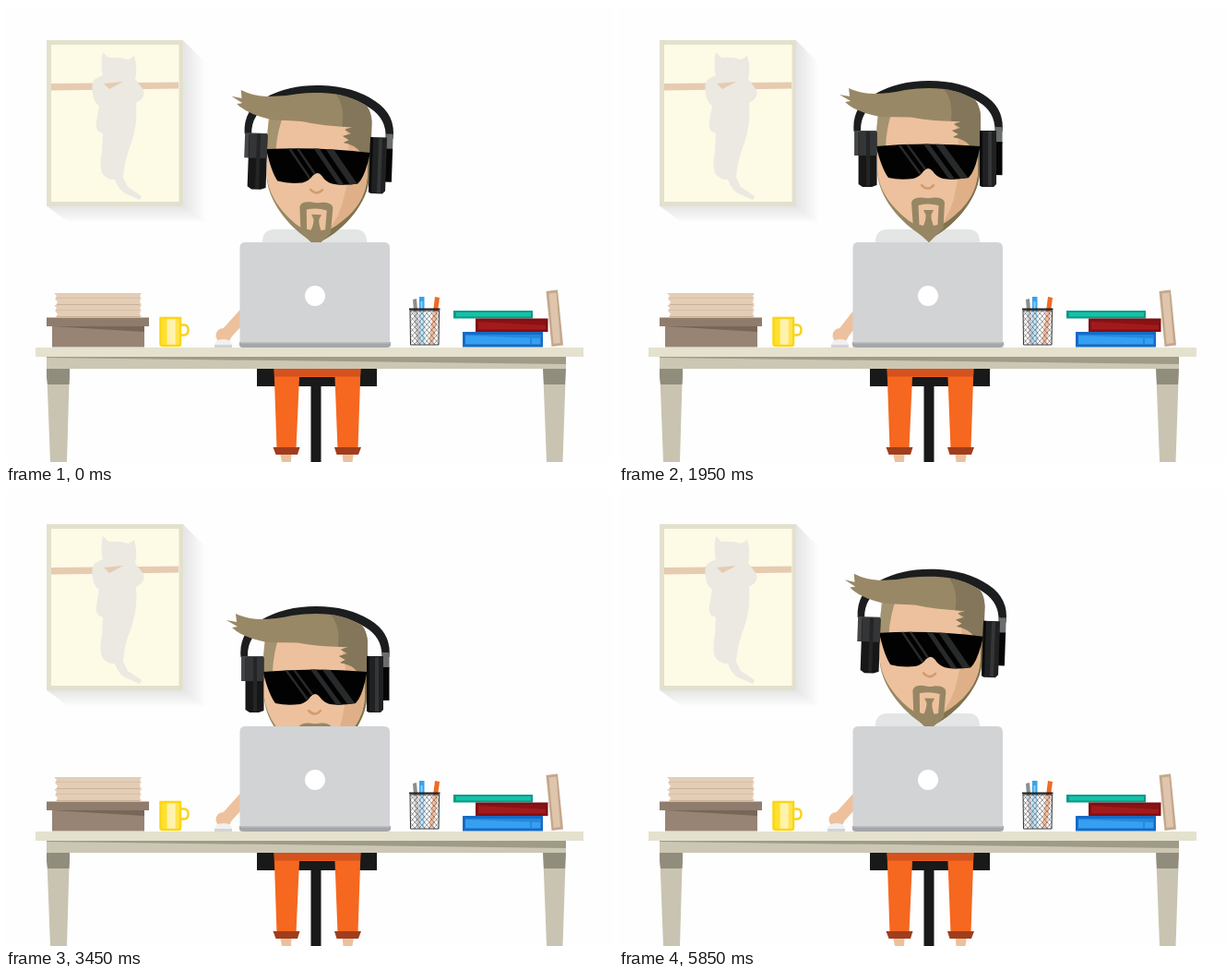
Write an HTML page that moves like this. It is 658x494 px and loops after 5.88 s.

```html
<!DOCTYPE html>
<html lang="en">
<head>
<meta charset="utf-8">
<title>Desk music</title>
<style>
html, body { margin: 0; width: 100%; height: 100%; overflow: hidden; background: #fefefe; }
svg { display: block; width: 658px; height: 494px; }
</style>
</head>
<body>
<svg viewBox="0 0 658 494" xmlns="http://www.w3.org/2000/svg">
  <defs>
    <linearGradient id="mug">
      <stop offset=".3" stop-color="#ffe02e"/><stop offset=".36" stop-color="#fff1a6"/>
      <stop offset=".72" stop-color="#fff3b4"/><stop offset=".78" stop-color="#ffe44c"/>
    </linearGradient>
    <pattern id="mesh" width="5.200" height="6" patternUnits="userSpaceOnUse" x="438" y="330">
      <path d="M0 0L5.200 6M5.200 0L0 6" stroke="#555" stroke-width=".6"/>
    </pattern>
    <clipPath id="lens"><use href="#lensShape"/></clipPath>
    <clipPath id="face"><use href="#faceShape"/></clipPath>
    <clipPath id="hairClip"><use href="#hairShape"/></clipPath>
  </defs>

  <!-- poster -->
  <g id="shadow"></g>
  <path d="M44 37H192V217H44Z" fill="#e3e1cd"/>
  <path d="M49 42H187.500V212H49Z" fill="#fdfae6"/>
  <path d="M49 84L187 82.500V89.500L49 91.500Z" fill="#e6cbb1"/>
  <path d="M105 50L111 56Q122 55 133 58L139 54Q143 68 140 79L149 91Q151 99 144 103L141 105Q143 128 136 148Q128 168 127 186L132 196L147 206L145 210L129 203Q122 199 118 188Q110 189 104 181Q101 171 104 158L105 138Q96 136 98 125L101 108Q95 104 94 95Q92 82 97 79L105 75Q102 62 105 50Z" fill="#ebe9e1"/>
  <path d="M106 84L127 82L112 90Z" fill="#e6cbb1"/>

  <!-- chair and legs -->
  <path d="M272 391H402V412H341.500V494H330.500V412H272Z" fill="#191919"/>
  <path d="M297 484H309.500L309 494H299ZM364.500 484H377L375.500 494H365.500Z" fill="#edc09c"/>
  <path d="M290.500 391H384.500L381.500 480H359.500L356.500 402H318L314.500 480H293.500Z" fill="#f6671f"/>
  <path d="M290.500 391H384.500L384 401.500H291Z" fill="#d5521f"/>
  <path d="M289.500 478H318.500L316 486H292.500ZM356 478H385L382 486H358.500Z" fill="#a03d1c"/>

  <!-- desk -->
  <path d="M44 390H69L66 494H48ZM582 390H607L603.500 494H586Z" fill="#c9c4b1"/>
  <path d="M44 392H69V402L68.500 410H45L44 402ZM582 392H607L606 410H583Z" fill="#918d7c"/>
  <path d="M44 379H607V393H44Z" fill="#cbc7b3"/>
  <path d="M44 379H607V388L44 381Z" fill="#a09b87"/>
  <path d="M32 370H626V380H32Z" fill="#e4e1cf"/>

  <!-- papers and box -->
  <g id="papers"></g>
  <path d="M50 346H150V369.500H50Z" fill="#988474"/>
  <path d="M50 346H150V353L50 347Z" fill="#786658"/>
  <path d="M44 337.500H155V347H44Z" fill="#8f7c6c"/>

  <!-- mug -->
  <path d="M190 345.500H193Q197.500 345.500 197.500 351Q197.500 356.500 193 356.500H190" fill="none" stroke="#fad21c" stroke-width="2.500"/>
  <path d="M167.500 338H189V366Q189 368 187 368H170Q167.500 368 167.500 366Z" fill="url(#mug)" stroke="#fcd515" stroke-width="2.500"/>

  <!-- pen pot -->
  <path d="M441 318L445 317L449 366H445Z" fill="#8b8d8e"/>
  <path d="M448 315H453.500V366H448Z" fill="#35a3ec"/>
  <path d="M449.500 320H451.500V366H449.500Z" fill="#8dd0f8"/>
  <path d="M465 315L470 316L463.500 366H458.500Z" fill="#f06a24"/>
  <path d="M438 330H469.500L469 367H438.500Z" fill="#fff" fill-opacity=".55"/>
  <path d="M438 330H469.500L469 367H438.500Z" fill="url(#mesh)" stroke="#333"/>
  <path d="M437 328.500H470.500" stroke="#222" stroke-width="2.200"/>

  <!-- books -->
  <path d="M485 330H571V338.500H485Z" fill="#0b9a85"/><path d="M488 332H569V336.500H488Z" fill="#13c2aa"/>
  <path d="M509 338.500H587.500V353H509Z" fill="#7f1013"/><path d="M512 341H585V350.500H512Z" fill="#a31a1d"/>
  <path d="M512 341H585V346L512 342Z" fill="#8a1215"/>
  <path d="M495 353H582V369.500H495Z" fill="#176ac4"/><path d="M498 356H579.500V366.500H498Z" fill="#35a0f2"/>
  <path d="M498 356H579.500V360L498 357ZM568 356H570V366.500H568Z" fill="#2388de"/>
  <path d="M585.500 309L598 307.500L604 367.500L591.500 369Z" fill="#c4a78c"/>
  <path d="M588.500 311.500L596.500 310.500L601 365L593.500 366Z" fill="#dfc5ac"/>

  <path id="hood" d="M278 262V254Q279 242 291 242H379Q390 242 391 254V262Z" fill="#e4e5e5"/>

  <g id="head">
    <path d="M254.500 137Q252 110 276 97Q302 82 336 82Q371 82 395 97Q418 111 415.500 137H407.500Q408 116 390 105Q368 91 336 91Q304 91 281 104Q261 115 262 137Z" fill="#1c1d1e"/>
    <path d="M280 120L391 118V180C391 206 367 237 341 251L336 257L331 251C305 237 280 206 280 180Z" fill="#978663"/>
    <path d="M391 118V180C391 206 367 237 341 251L352 236L385 186Z" fill="#80734f"/>
    <path id="faceShape" d="M280 106H389V180Q388 203 371 221Q357 235 345 240H326Q313 235 300 221Q282 202 280 180Z" fill="#edc19d"/>
    <path d="M361 112Q374 160 365 200Q361 224 347 241H395V112Z" fill="#dfb088" clip-path="url(#face)"/>
    <path d="M282 116L296 115Q290 132 289 153H279Q278 130 282 116Z" fill="#a49370"/>
    <path id="hairShape" d="M239 97L250 99L249 90Q262 96 276 96Q293 96 310 92Q323 90 336 90Q366 90 386 103Q391 109 392 120V153H381Q375 145 362 143L368 140L361 136L370 133L363 129L371 126Q340 126 316 121.500Q299 121 283 121Q256 116 245 105L251 104Z" fill="#998866"/>
    <path d="M347 86Q363 99 360 124L362 143L382 158H396V86Z" fill="#83765a" clip-path="url(#hairClip)"/>

    <path d="M317 214Q318 208 329 208.500Q335 210 341 208.500Q352 208 353 214L351.500 242L336 257L319 242Z" fill="#978663"/>
    <path d="M324.500 217Q335 214 346.500 217L345.500 238L341 239Q338 232 338.500 227L341 222H330L332.500 227Q333 232 330 239L325.500 238Z" fill="#edc19d"/>
    <path d="M328 195Q335 202 341 195" fill="none" stroke="#d29b6f" stroke-width="2.500" stroke-linecap="round"/>

    <path id="lensShape" d="M278.500 153Q335 148 391.500 153L389 164Q385 181 379 187Q362 190 351 188Q344 186 340 180Q335 174 330 180Q326 186 319 188Q304 190 292 187Q285 178 278.500 153Z" fill="#020202"/>
    <g clip-path="url(#lens)" stroke="#28292a">
      <path d="M299 145L335 194M308 145L344 194" stroke-width="2.500"/>
      <path d="M329 145L365 194" stroke-width="5"/><path d="M343 145L379 194" stroke-width="7"/>
    </g>

    <path d="M255 136H279V163H255Z" fill="#454647"/>
    <path d="M259.500 138H279.500V195L274 197H264L259.500 194Z" fill="#171717"/>
    <path d="M260 137H279.500V163H260Z" fill="#343536"/>
    <path d="M268 137H272V196H268Z" fill="#242526"/>
    <path d="M408 132H415.500V150H408Z" fill="#6b6c6d"/>
    <path d="M405 148H415.500V184H405Z" fill="#060606"/>
    <path d="M391 136H409V194L406 197H393L391 195Z" fill="#202122"/>
    <path d="M400 137H404V196H400Z" fill="#353637"/>
    <path d="M391 136H394V196H391Z" fill="#0c0c0c"/>
  </g>

  <path id="arm" fill="none" stroke="#edc19d" stroke-width="13" stroke-linecap="round"/>
  <g id="hand">
    <ellipse cx="236" cy="357" rx="8.500" ry="8" fill="#edc19d"/>
    <path d="M226 368Q226 361 236 361Q245 361 245 368Z" fill="#f0f0f0"/>
    <path d="M226 367H245V370H226Z" fill="#d3d4d4"/>
  </g>

  <!-- laptop -->
  <path d="M253.500 367V262Q253.500 256 259.500 256H410Q416 256 416 262V367Z" fill="#d1d3d5"/>
  <path d="M253 364H417V367Q417 370 413 370H257Q253 370 253 367Z" fill="#a4a6a9"/>
  <path d="M254 364H416V365.500H254Z" fill="#bcbec0"/>
  <circle cx="335" cy="314" r="11" fill="#fff"/>
</svg>
<script>
const LOOP = 5880, BEAT = 588, STEP = 30;
const $ = id => document.getElementById(id);

// stacked faint copies fade the shadow away from the frame
$("shadow").innerHTML = Array.from({ length: 8 }, (_, i) => {
  const d = 2.9 * (i + 1), e = 0.74 * d;
  return `<path d="M192 37L${192 + d} ${37 + d}V${217 + e}H${44 + d}L44 217Z" fill="#000" fill-opacity=".011"/>`;
}).join("");

$("papers").innerHTML = [311, 317.5, 324, 330.5].map((y, i) => {
  const x = 52 + i % 2;
  return `<path d="M${x} ${y}H${147 - i % 2}L145 ${y + 3}L147 ${y + 6.2}H${x + 1}L${x + 3} ${y + 3}Z" fill="#e4cdb6"/>` +
    `<path d="M${x + 2} ${y + 6}H145" stroke="#cbb199" stroke-width="1"/>`;
}).join("");

// rows of [time, value], eased between neighbours
const TILT = [[0, 2], [376, -2], [588, -2], [964, 2], [1764, 2], [2140, -2],
  [2940, -2], [3400, 0], [4770, 0], [5210, 5.5], [5370, 5.3], [5760, 2], [LOOP, 2]];
const DROP = [[2940, 0], [3130, -8], [3420, 40], [5250, 40], [5400, 33], [5640, -8], [LOOP, 0]];
const MOUSE = [[0, 0], [630, 0], [960, 4], [1950, 4], [2400, -3], [2820, 0], [3600, 0],
  [4100, -8], [4400, -6], [4750, -9], [4980, -8], [5430, -4], [5760, 0], [LOOP, 0]];

function track(keys, t) {
  const i = Math.max(1, keys.findIndex(k => k[0] >= t));
  const [t0, a] = keys[i - 1], [t1, b] = keys[i];
  const p = (t - t0) / (t1 - t0);
  return a + (b - a) * p * p * (3 - 2 * p);
}

function draw(t) {
  const y = t < 2940 ? -7 * Math.sin(Math.PI * t / BEAT) ** 2 : track(DROP, t);
  const x = track(MOUSE, t);
  $("head").setAttribute("transform", `translate(0 ${y + 4}) rotate(${track(TILT, t)} 336 254)`);
  $("hood").setAttribute("transform", `translate(0 ${Math.max(0, y)})`);
  $("hand").setAttribute("transform", `translate(${x} 0)`);
  $("arm").setAttribute("d", `M${238 + x} 356L267 324`);
}

const start = performance.now();
function tick() {
  const t = (performance.now() - start) % LOOP;
  draw(Math.floor(t / STEP) * STEP);
  requestAnimationFrame(tick);
}
tick();
</script>
</body>
</html>
```
